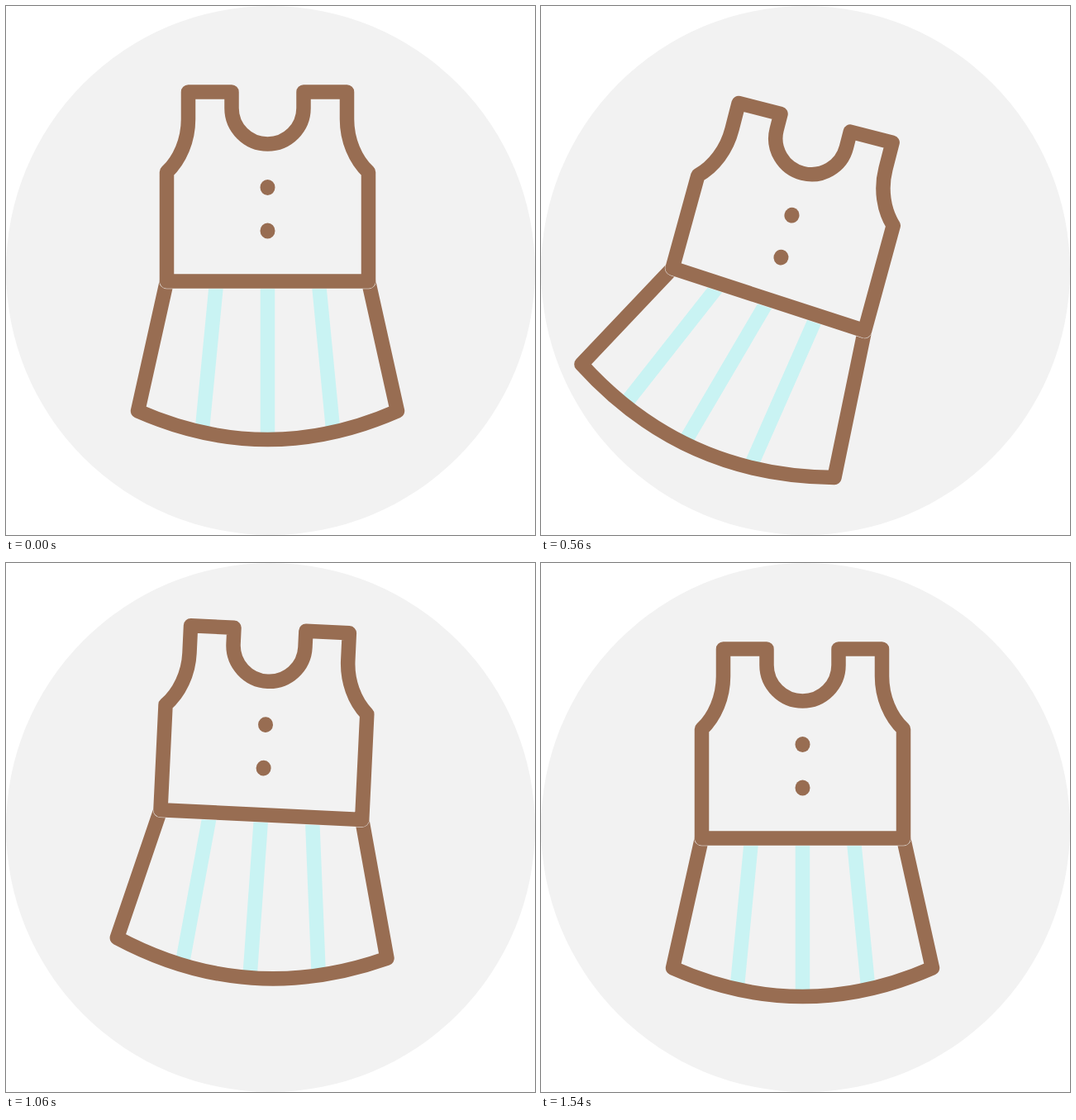
These frames come from a looping animation (640x640 px, 1800 ms). An HTML page:

```html
<!DOCTYPE html>
<html>
<head>
<meta charset="utf-8">
<style>
  html, body { margin: 0; width: 100%; height: 100%; overflow: hidden; background: #fff; }
  svg { display: block; width: 100%; height: 100%; }
  path { fill: none; stroke: #986d52; stroke-width: 17.5; stroke-linejoin: round; }
  #stripes { stroke: #c9f3f3; }
  #seam { stroke: #f2f2f2; stroke-width: 18.4; }
</style>
</head>
<body>
<svg viewBox="0 0 640 640">
  <circle cx="320" cy="320" r="320" fill="#f2f2f2"/>
  <g id="dress">
    <path id="stripes"/>
    <path id="skirt"/>
    <path id="seam"/>
    <path id="body"/>
    <g fill="#986d52">
      <ellipse cy="52.5" rx="9" ry="9.4"/>
      <ellipse cy="105" rx="9" ry="9.4"/>
    </g>
  </g>
</svg>
<script>
const LOOP = 1800, END = 1540;
const WAIST = 166, HEM_RADIUS = 222;
// Turning points of the swing
const LEFT = 555, RIGHT = 905, LEFT_AGAIN = 1130, RIGHT_AGAIN = 1355;
// Turning points of the jump
const CROUCH = 685, TOP = 1075;

const $ = id => document.getElementById(id);
const mix = (a, b, t) => a.map((v, i) => v + (b[i] - v) * t);

function ease(from, to, time) {
  const t = Math.min(1, Math.max(0, (time - from) / (to - from)));
  return t * t * (3 - 2 * t);
}

// Rises from 0 at start to 1 at peak and falls back to 0 at end
const bump = (start, peak, end, time) => ease(start, peak, time) - ease(peak, end, time);

const height = time => 38.7 * bump(0, CROUCH, TOP, time) - 24 * bump(CROUCH, TOP, END, time);

// A hem corner swings around the middle of the waist
function hemCorner(side, degrees, stretch) {
  const angle = degrees * Math.PI / 180, radius = HEM_RADIUS + stretch;
  return [side * radius * Math.cos(angle), WAIST + radius * Math.sin(angle)];
}

// Coordinates are relative to the lowest point of the neckline
function draw(time) {
  const left = bump(0, LEFT, RIGHT, time) + .38 * bump(RIGHT, LEFT_AGAIN, RIGHT_AGAIN, time);
  const right = bump(LEFT, RIGHT, LEFT_AGAIN, time) + .15 * bump(LEFT_AGAIN, RIGHT_AGAIN, END, time);

  const shift = 2 * (right - left);
  const waistL = [-122 + shift, WAIST - 15.7 * left];
  const waistR = [122 + shift, WAIST - 19 * right];
  const hemL = hemCorner(-1, 45 - 13.4 * left + 5.5 * right, 15 * left);
  const hemR = hemCorner(1, 45 + 9.6 * left - 11 * right, 25 * right);

  const mid = mix(hemL, hemR, .5);
  const sag = [mid[0] - (hemR[1] - hemL[1]) * .22, mid[1] + (hemR[0] - hemL[0]) * .22];
  const hemAt = t => mix(mix(hemL, sag, t), mix(sag, hemR, t), t);
  // The stripes drift sideways, trailing the crouch a little
  const drift = .0014 * Math.max(0, height(time - 50));

  $('dress').setAttribute('transform',
    `translate(316.5 ${167 + height(time)}) rotate(${14.4 * left - 7 * right})`);
  $('stripes').setAttribute('d', [.247, .5, .753]
    .map(t => `M${mix(waistL, waistR, t)}L${hemAt(t - drift)}`).join(''));
  $('skirt').setAttribute('d', `M${waistL}L${hemL}Q${sag} ${hemR}L${waistR}`);
  const body = `M-96-63H-43.5V-43.5A43.5 43.5 0 0 0 43.5-43.5V-63H96V-30
    C96-5 106 19 122 34L${waistR}L${waistL}L-122 34C-106 19-96-5-96-30Z`;
  $('seam').setAttribute('d', body);
  $('body').setAttribute('d', body);
}

function frame() {
  draw(performance.now() % LOOP);
  requestAnimationFrame(frame);
}
frame();
</script>
</body>
</html>
```
